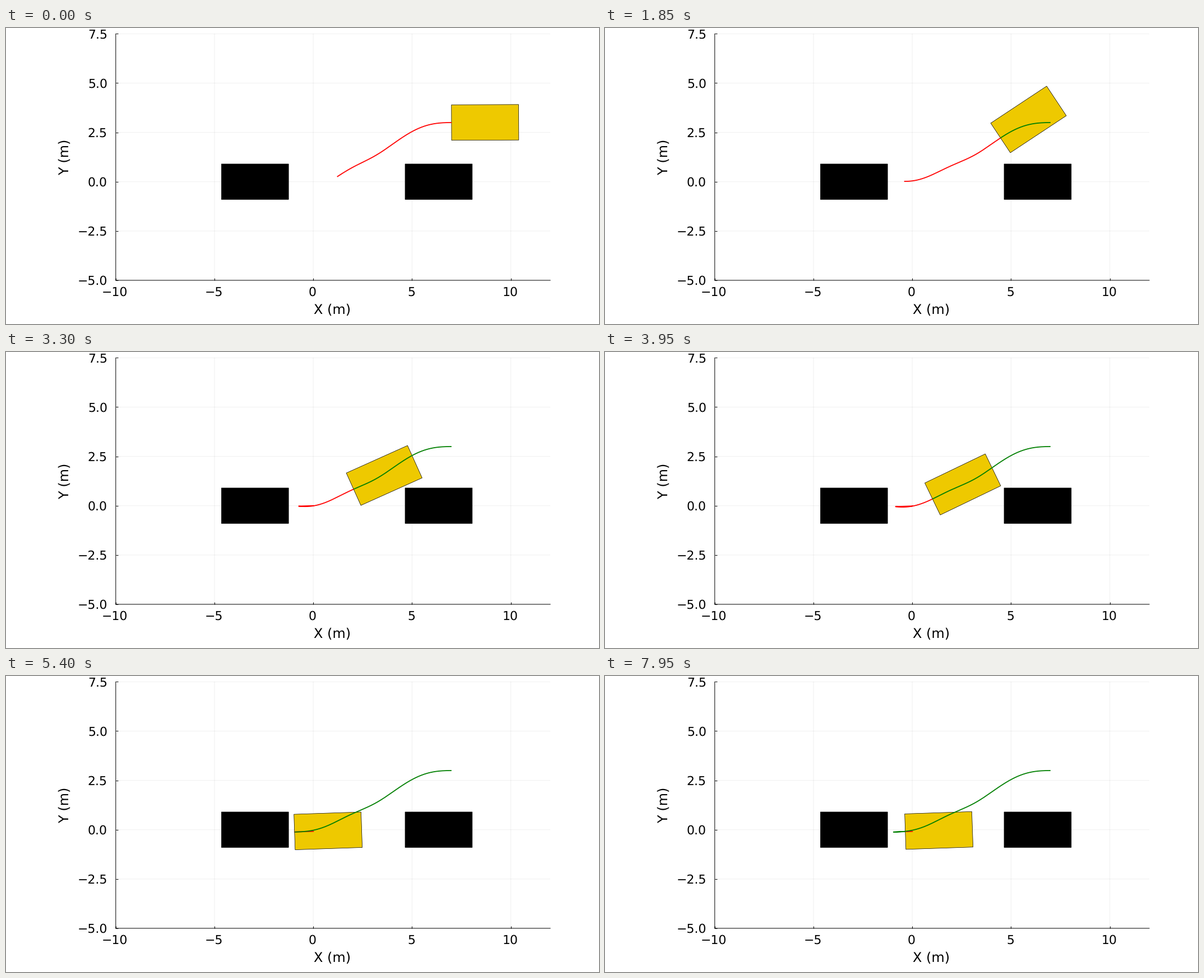
Animation of 1058x529 px, one loop 8 s. Source, as a matplotlib script:

```python
import numpy as np
import matplotlib.pyplot as plt
from matplotlib.animation import FuncAnimation
from matplotlib.patches import Polygon, Rectangle

W, H, DPI = 1058, 529, 100
PX = 72 / DPI                      # points per pixel
SCALE = 35.24                      # pixels per metre
LEFT, BOTTOM = 195.8, 450.9
STEP, FRAMES = 0.05, 160
LENGTH, WIDTH = 3.4, 1.8

START_X, START_Y = 7, 3
TURN_X, GOAL_X = -0.95, 0.03
TURN_TIME = 5.45
END_SLOPE = 0.034

# Extremes of the path's slope, eased in between
BEND_X = [TURN_X, 1.35, 2.4, 4.0, 7.15]
BEND_SLOPE = [END_SLOPE, 0.505, 0.43, 0.70, 0]

# Speed up, cruise, brake, then creep forward
SPEED_TIME = [0, 1, 2.3, 5.1, TURN_TIME, 6.05]
SPEED = [0, 2, 2, 1.45, 0, 0.27]


def eased(x, keys, values):
    u = np.interp(x, keys, np.arange(len(keys)))
    i = np.floor(u)
    return np.interp(i + (1 - np.cos(np.pi * (u - i))) / 2,
                     np.arange(len(keys)), values)


def integral(y, x):
    return np.append(0, np.cumsum((y[1:] + y[:-1]) / 2 * np.diff(x)))


# The route: reverse along the bends, then straight ahead to the goal.
back_x = np.linspace(START_X, TURN_X, 800)
back_slope = eased(back_x, BEND_X, BEND_SLOPE)
back_y = START_Y + integral(back_slope, back_x)
ahead_x = np.linspace(TURN_X, GOAL_X, 100)[1:]
route_x = np.append(back_x, ahead_x)
route_y = np.append(back_y, back_y[-1] + END_SLOPE * (ahead_x - TURN_X))
route_slope = np.append(back_slope, np.full(len(ahead_x), END_SLOPE))
route_s = np.append(0, np.cumsum(np.hypot(np.diff(route_x),
                                          np.diff(route_y))))

clock = np.linspace(0, FRAMES * STEP, 3201)
travel = integral(np.interp(clock, SPEED_TIME, SPEED), clock)


def pose(s):
    x, y, slope = (np.interp(s, route_s, v)
                   for v in (route_x, route_y, route_slope))
    return x, y, np.arctan(slope)


def car_corners(x, y, angle):
    c, s = np.cos(angle), np.sin(angle)
    half = WIDTH / 2
    box = np.array([(0, -half), (LENGTH, -half), (LENGTH, half), (0, half)])
    return box @ np.array([(c, s), (-s, c)]) + (x, y)


def driven(s, x, y):
    done = route_s < s
    return np.append(route_x[done], x), np.append(route_y[done], y)


def planned(t, s, x, y):
    """Rest of the plan, whose far end shifts while it is refined."""
    if t >= TURN_TIME:
        rest = route_s > s
        return np.append(x, route_x[rest]), np.append(y, route_y[rest])
    early = max(0, 1 - t / 0.9)
    end = TURN_X + 0.8 * max(0, (5 - t) / 4.1) ** 1.5 + 1.08 * early
    end = min(end, x - 1e-3)
    lift = 0.11 * (1 - (t / TURN_TIME) ** 3) - 0.29 * early
    xs = np.linspace(x, end, 160)
    ys = np.interp(xs, back_x[::-1], back_y[::-1])
    ys += lift * ((x - xs) / (x - end)) ** 5
    hook = np.clip((t - 1.9) / 1.3, 0, 1) * (GOAL_X - end)
    return np.append(xs, end + hook), np.append(ys, ys[-1] + END_SLOPE * hook)


plt.rcParams["font.family"] = "DejaVu Sans"
plt.rcParams["text.hinting"] = "none"
fig = plt.figure(figsize=(W / DPI, H / DPI), dpi=DPI, facecolor="white")
ax = fig.add_axes([LEFT / W, 1 - BOTTOM / H, 22 * SCALE / W,
                   12.5 * SCALE / H])
ax.set_xlim(-10, 12)
ax.set_ylim(-5, 7.5)
ax.set_xticks(range(-10, 11, 5))
ax.set_yticks(np.arange(-5, 7.6, 2.5))
ax.spines[["top", "right"]].set_visible(False)
ax.spines[["left", "bottom"]].set_linewidth(PX)
ax.tick_params(direction="in", length=4 * PX, width=PX,
               labelleft=False, labelbottom=False)
ax.set_axisbelow(True)
ax.grid(color="black", alpha=0.06, linewidth=PX)


def label(x, y, text, size=22, **kw):
    fig.text(x / W, 1 - y / H, text, fontsize=size * PX, va="baseline", **kw)


def number(value, digits):
    return f"{value:.{digits}f}".replace("-", "\u2212")


for v in ax.get_xticks():
    label(LEFT + (v + 10) * SCALE - 1.5, 479, number(v, 0), ha="center")
for v in ax.get_yticks():
    label(180.8, BOTTOM - (v + 5) * SCALE + 8, number(v, 1), ha="right")
label(582.2, 510.5, "X (m)", 24, ha="center")
label(112, 230.5, "Y (m)", 24, ha="center", rotation=90,
      rotation_mode="anchor")

for x in (-4.65, 4.65):
    ax.add_patch(Rectangle((x, -WIDTH / 2), LENGTH, WIDTH, facecolor="black",
                           edgecolor="black", linewidth=0.7 * PX, zorder=3))
car = ax.add_patch(Polygon(car_corners(*pose(0)), facecolor="#eec900",
                           edgecolor="black", linewidth=0.7 * PX, zorder=4))
plan, = ax.plot([], [], color="red", linewidth=1.8 * PX, zorder=5)
trail, = ax.plot([], [], color="green", linewidth=1.8 * PX, zorder=6)
for line in (plan, trail):
    line.set_solid_capstyle("butt")
for artist in ax.findobj():
    artist.set_snap(False)


def draw(k):
    t = k * STEP
    s = np.interp(t, clock, travel)
    x, y, angle = pose(s)
    car.set_xy(car_corners(x, y, angle))
    plan.set_data(*planned(t, s, x, y))
    trail.set_data(*driven(s, x, y))
    return car, plan, trail


anim = FuncAnimation(fig, draw, frames=FRAMES, interval=STEP * 1000,
                     repeat=True, repeat_delay=0)
plt.show()
```
